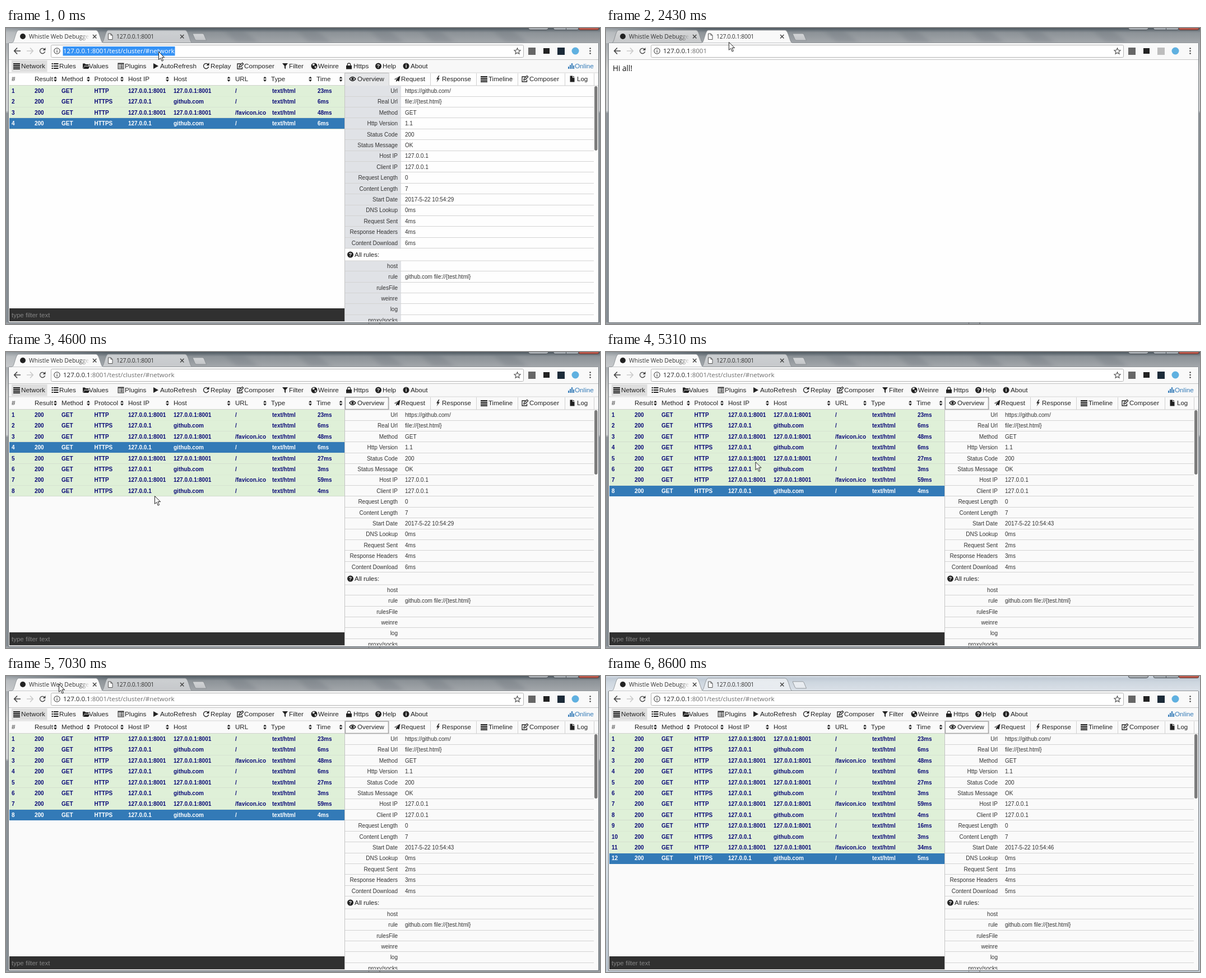
These frames come from a looping animation (1060 by 529 pixels, 8700 ms). An HTML page:

```html
<!DOCTYPE html>
<html lang="en">
<head>
<meta charset="utf-8">
<title>Network panel walkthrough</title>
<style>
html, body { margin: 0; width: 100%; height: 100%; overflow: hidden; }
svg { display: block; width: 100vw; height: 100vh; }
text { font-family: "Liberation Sans", Arial, sans-serif; white-space: pre; }
.ui { font-family: "Open Sans", "Noto Sans", sans-serif; }
.cjk { font-family: "Noto Sans CJK SC", "Noto Sans CJK", sans-serif; }
.b { font-weight: bold; }
.k { animation: 8700ms step-end infinite; }

.select { animation-name: select; }
.early { animation-name: early; }
.tip { animation-name: tip; }
.page { animation-name: page; }
.status { animation-name: status; }
.more1 { animation-name: more1; }
.more2 { animation-name: more2; }
.s1 { animation-name: s1; }
.s2 { animation-name: s2; }
.s3 { animation-name: s3; }
.light { animation-name: light; }
.arrow { animation-name: arrow; }
.move { animation-name: move; }

@keyframes select { 0% { opacity: 1 } 9.195% { opacity: 0 } }
@keyframes early { 0% { opacity: 1 } 23.448% { opacity: 0 } }
@keyframes tip { 0% { opacity: 0 } 18.62% { opacity: .5 } 20.229% { opacity: 1 } 23.448% { opacity: 0 } }
@keyframes page { 0% { opacity: 0 } 23.448% { opacity: 1 } 43.218% { opacity: 0 } 66.321% { opacity: 1 } 79.195% { opacity: 0 } }
@keyframes status { 0% { opacity: 0 } 37.011% { opacity: 1 } 41.838% { opacity: .6 } 43.218% { opacity: 0 } 72.873% { opacity: 1 } 77.7% { opacity: .6 } 79.195% { opacity: 0 } }
@keyframes more1 { 0% { opacity: 0 } 44.827% { opacity: 1 } }
@keyframes more2 { 0% { opacity: 0 } 82.528% { opacity: 1 } }
@keyframes s1 { 0% { opacity: 1 } 56.436% { opacity: 0 } }
@keyframes s2 { 0% { opacity: 0 } 56.436% { opacity: 1 } 89.195% { opacity: 0 } }
@keyframes s3 { 0% { opacity: 0 } 89.195% { opacity: 1 } }
@keyframes light { 0% { opacity: 0 } 98.85% { opacity: 1 } }
@keyframes arrow { 0% { opacity: 1 } 98.85% { opacity: 0 } }
@keyframes move {
  0% { transform: translate(272px, 42px) }
  1.724% { transform: translate(272px, 42px); animation-timing-function: steps(2, start) }
  4.597% { transform: translate(391px, 95px); animation-timing-function: steps(2, start) }
  7.471% { transform: translate(338px, 161px) }
  9.195% { transform: translate(338px, 161px); animation-timing-function: steps(1, start) }
  10.69% { transform: translate(335px, 184px); animation-timing-function: steps(5, start) }
  18.62% { transform: translate(280px, 18px) }
  25.138% { transform: translate(280px, 18px); animation-timing-function: steps(7, start) }
  36.78% { transform: translate(66px, 42px) }
  38.586% { transform: translate(66px, 42px); animation-timing-function: steps(2, start) }
  41.838% { transform: translate(94px, 15px) }
  44.827% { transform: translate(94px, 15px); animation-timing-function: steps(3, start) }
  49.655% { transform: translate(253px, 262px) }
  49.77% { transform: translate(253px, 262px); animation-timing-function: steps(3, start) }
  54.42% { transform: translate(265px, 257px) }
  59.655% { transform: translate(265px, 257px); animation-timing-function: steps(4, start) }
  66.321% { transform: translate(271px, 14px) }
  68.046% { transform: translate(271px, 14px); animation-timing-function: steps(3, start) }
  73.103% { transform: translate(66px, 42px) }
  74.482% { transform: translate(66px, 42px); animation-timing-function: steps(3, start) }
  79.31% { transform: translate(94px, 14px) }
  82.528% { transform: translate(94px, 14px); animation-timing-function: steps(2, start) }
  85.977% { transform: translate(302px, 314px); animation-timing-function: steps(1, start) }
  87.356%, 100% { transform: translate(303px, 317px) }
}
</style>
</head>
<body>
<svg id="stage" viewBox="0 0 1060 529" preserveAspectRatio="none"></svg>
<script>
const rect = (x, y, w, h, fill, more = '') =>
  `<rect x="${x}" y="${y}" width="${w}" height="${h}" fill="${fill}" ${more}/>`;
const text = (x, y, s, size, fill = '#222', more = '') =>
  `<text x="${x}" y="${y}" font-size="${size}" fill="${fill}" ${more}>${s}</text>`;
const path = (d, fill, more = '') => `<path d="${d}" fill="${fill}" ${more}/>`;
const line = (d, stroke, w = 1) => path(d, 'none', `stroke="${stroke}" stroke-width="${w}"`);
const dot = (x, y, r, fill, more = '') => `<circle cx="${x}" cy="${y}" r="${r}" fill="${fill}" ${more}/>`;
const group = (cls, s) => `<g class="k ${cls}">${s}</g>`;
const END = 'text-anchor="end"', MID = 'text-anchor="middle"';

// Icons are centred on 0,0: f is filled, s is stroked, w is cut out in white.
const icons = {
  bars: { f: 'M-6-5h12v1.9h-12zM-6-2h12v1.9h-12zM-6 1h12v1.9h-12zM-6 4h12v1.9h-12z' },
  rules: { f: 'M-6-5h2.5v2h-2.5zM-2.5-5h8.5v2h-8.5zM-6-1h2.5v2h-2.5zM-2.5-1h8.5v2h-8.5zM-6 3h2.5v2h-2.5zM-2.5 3h8.5v2h-8.5z' },
  folder: { f: 'M-6-4.5h4l1 1.5h5.5v2.5h-7.5l-2.5 5h-.5zM-3 .5h9.5l-2.5 4.5h-9z' },
  plugins: { f: 'M-5.5-5.5h11v11h-11zM-4.5-3.5v8h9v-8zM-3.5-2.5h1.5v1.2h-1.5zM-1-2.5h4.5v1.2h-4.5zM-3.5 0h1.5v1.2h-1.5zM-1 0h4.5v1.2h-4.5zM-3.5 2.3h1.5v1.2h-1.5zM-1 2.3h4.5v1.2h-4.5z' },
  play: { f: 'M-4-5l9 5-9 5z' },
  replay: { f: 'M5.5-6v5h-5z', s: 'M3.6-3A4.6 4.6 0 1 0 4.6 1' },
  edit: { s: 'M3.5 1.5v3.5h-8.5v-9h6M-2 2l.7-2.7 5-5 2 2-5 5z' },
  filter: { f: 'M-5-5h10l-4 5v5.5l-2-1.7v-3.8z' },
  globe: { f: 'M-5.5 0a5.5 5.5 0 1 1 11 0a5.5 5.5 0 1 1-11 0z', w: 'M-3-3.5l3-1 1 2-2 2-2-1zM.5 0l3.5 1-2.2 3.2z' },
  lock: { f: 'M-5-1h10v6.5h-10z', s: 'M-2.7-.5v-2a2.7 2.7 0 0 1 5.4 0v2' },
  chart: { f: 'M-5 1h2v4h-2zM-2-2h2v7h-2zM1-5h2v10h-2zM4-1h2v6h-2z' },
  eye: { f: 'M-2.2 0a2.2 2.2 0 1 1 4.4 0a2.2 2.2 0 1 1-4.4 0z', s: 'M-5.5 0Q0-7 5.5 0Q0 7-5.5 0z' },
  plane: { f: 'M-5.5 1L5.5-5.5l-2 10-3.3-1.5-2 2.5v-3.7l4.3-5-5.5 4.3z' },
  bolt: { f: 'M1-6l-4 6.5h2.5l-2 5.5 5.5-7.5h-2.8l2.3-4.5z' },
  file: { f: 'M-4-5.5h4.5v3.5h3.5v7.5h-8zM1.5-5.5l2.5 2.5h-2.5z' }
};
const icon = (name, x, y, color = '#222') => {
  if (name === 'help' || name === 'info')
    return dot(x, y, 5.5, color) + text(x, y + 3.3, name === 'help' ? '?' : 'i', 9.5, '#fff', `class="b" ${MID}`);
  const { f, s, w } = icons[name];
  return `<g transform="translate(${x} ${y})">` +
    (f ? path(f, color, 'fill-rule="evenodd"') : '') +
    (s ? line(s, color, 1.3) : '') + (w ? path(w, '#fff') : '') + '</g>';
};

const tab = (x, w, fill) =>
  path(`M${x} 26.5C${x + 4} 26 ${x + 6} 5 ${x + 11} 4H${x + w - 12}C${x + w - 6} 5 ${x + w - 4} 26 ${x + w} 26.5z`, fill, 'stroke="#85898d" stroke-width=".8"');
const cross = x => line(`M${x - 3} 12l6.4 6.4m0-6.4l-6.4 6.4`, '#444', 1.4);

// Tab strip, toolbar and address bar; first tells which tab is active.
function chrome(first) {
  const bar = '#f9f9f9';
  const left = tab(11, 162, first ? bar : 'url(#idle)'), right = tab(171, 161, first ? 'url(#glass)' : bar);
  const host = '<tspan fill="#222">127.0.0.1</tspan>';
  return (first ? right + left : left + right) +
    rect(5, 26.5, 1052, 30, bar) +
    line(first ? 'M5 26.5H11M173 26.5H1057' : 'M5 26.5H171M332 26.5H1057', '#909498') +
    dot(30, 15, 5, '#222') +
    text(41, 19, 'Whistle Web Debugger', 10.5, 'url(#fade)', 'class="ui"') + cross(158) +
    path('M182.5 10h4.5l3 3v7.5h-7.5zM187 10v3h3', '#fff', 'stroke="#555"') +
    text(197, 19, '127.0.0.1:8001', 10.3, '#333', 'class="ui" letter-spacing="-.2"') + cross(314) +
    line('M26 41H15M20 35.5L14.8 41L20 46.5', '#444', 1.7) +
    line('M37 41H48M43 35.5L48.2 41L43 46.5', '#ccc', 1.7) +
    icon('replay', 65, 41, '#444') +
    rect(80.5, 30.5, 843, 22, '#fff', 'rx="2" stroke="#b4b4b4"') +
    dot(91, 41, 5.2, 'none', 'stroke="#555" stroke-width="1.2"') + rect(90.4, 40, 1.3, 4, '#555') + rect(90.4, 37.8, 1.3, 1.3, '#555') +
    text(102, 45, host + ':8001' + (first ? '/test/cluster/#network' : ''), 11.5, '#6c6c6c', 'class="ui"') +
    line('M912.5 36l1.6 3.5 3.9.4-2.9 2.6.8 3.8-3.4-2-3.4 2 .8-3.8-2.9-2.6 3.9-.4z', '#555', 1.2) +
    rect(932, 35, 13, 13, '#666') + rect(959, 36, 11, 10, '#222') +
    rect(984, 35, 13, 13, first ? '#1b2a38' : '#bdbdbd') + dot(1016, 41, 6.5, '#5fb0e0') +
    [36.5, 41, 45.5].map(y => dot(1042.5, y, 1.3, '#444')).join('') +
    line('M5 56.5H1057', '#c4c4c4');
}

const PITCH = 19.4;
const times = [23, 6, 48, 6, 27, 3, 59, 4, 16, 3, 34, 5];

function row(n, on) {
  const y = 102.8 + (n - 1) * PITCH, plain = n % 2, ink = on ? '#fff' : '#0a0a78';
  const top = Math.ceil(y), end = Math.round(y + PITCH);
  const ip = plain ? '127.0.0.1:8001' : '127.0.0.1';
  const cells = [
    [10, n], [51, 200], [99, 'GET'], [157.5, plain ? 'HTTP' : 'HTTPS'], [218, ip],
    [299, plain ? ip : 'github.com'], [409, n % 4 === 3 ? '/favicon.ico' : '/'],
    [475, 'text/html'], [556, times[n - 1] + 'ms']
  ];
  return (on ? rect(6, top, 598, end - top, '#337ab7')
    : rect(6, y, 598, PITCH, '#dff0d8') + rect(6, Math.ceil(y + PITCH) - 1, 598, 1, '#d0dccc')) +
    cells.map(([x, s]) => text(x, y + 13.2, s, 10, ink, 'class="b"')).join('');
}
const rows = (from, to) => {
  let s = '';
  for (let n = from; n <= to; n++) s += row(n);
  return s;
};

function menu() {
  const items = [
    ['bars', 19, 27, 'Network'], ['rules', 87.5, 95, 'Rules'], ['folder', 143, 148, 'Values'],
    ['plugins', 205, 212, 'Plugins'], ['play', 267, 275, 'AutoRefresh'], ['replay', 357, 365, 'Replay'],
    ['edit', 418, 425, 'Composer'], ['filter', 498, 505, 'Filter'], ['globe', 550, 557, 'Weinre'],
    ['lock', 612, 620, 'Https'], ['help', 664.5, 672, 'Help'], ['info', 714, 722, 'About']
  ];
  return rect(5, 57, 1052, 23, '#f8f8f8') + rect(10, 58, 63.5, 20.5, '#dedede') +
    items.map(([i, x, tx, s]) => icon(i, x, 68) + text(tx, 72, s, 11.7)).join('') +
    icon('chart', 1008, 68, '#337ab7') + text(1015, 72, 'Online', 11.7, '#337ab7') +
    line('M5 80H1057', '#d4d4d4');
}

function table() {
  const heads = [
    [10, '#'], [51, 'Result', 88], [99, 'Method', 147], [157.5, 'Protocol', 207], [218, 'Host IP', 288],
    [299, 'Host', 397.5], [409, 'URL', 462], [473, 'Type', 543], [554, 'Time', 597.5]
  ];
  return heads.map(([x, s, sx]) => text(x, 95, s, 11.6) +
      (sx ? path(`M${sx - 3} 90.3l3-3.6 3 3.6zM${sx - 3} 92.3l3 3.6 3-3.6z`, '#222') : '')).join('') +
    line('M6 102.5H604', '#ccc') +
    rows(1, 4) + group('more1', rows(5, 8)) + group('more2', rows(9, 12)) +
    [4, 8, 12].map((n, i) => group('s' + (i + 1), row(n, true))).join('') +
    rect(6, 501, 598, 23.5, '#303030') + text(10, 517, 'type filter text', 11.5, '#858585') +
    line('M604.5 80V525', '#c4c4c4');
}

function panel() {
  const tabs = [
    ['eye', 618.5, 627, 'Overview', 683], ['plane', 698, 705, 'Request', 757], ['bolt', 771, 778, 'Response', 839],
    ['bars', 853, 861, 'Timeline', 913], ['edit', 926, 934, 'Composer', 997], ['file', 1010.5, 1019, 'Log', 1049]
  ];
  const fields = [
    ['Url', 'https://github.com/'], ['Real Url', 'file://{test.html}'], ['Method', 'GET'], ['Http Version', '1.1'],
    ['Status Code', '200'], ['Status Message', 'OK'], ['Host IP', '127.0.0.1'], ['Client IP', '127.0.0.1'],
    ['Request Length', '0'], ['Content Length', '7'], ['Start Date', ''], ['DNS Lookup', '0ms'],
    ['Request Sent', ''], ['Response Headers', ''], ['Content Download', '']
  ];
  const rules = [['host', ''], ['rule', 'github.com file://{test.html}'], ['rulesFile', ''], ['weinre', ''], ['log', ''], ['proxy/socks', '']];
  const runs = [['29', 4, 4, 6], ['43', 2, 3, 4], ['46', 1, 4, 5]];
  const base = i => 116 + i * PITCH;
  const value = (i, s) => text(712, base(i), s, 10, '#333');
  const list = (items, top) => items.map(([k, v], i) => {
    const y = top + i * PITCH;
    return text(699, y, k, 10, '#333', END) + text(712, y, v, 10, '#333') +
      line(`M605 ${Math.round(y + 5.5) + .5}H1049`, '#d3d3d3');
  }).join('');
  return line('M605 103H1057', '#ccc') +
    rect(605.5, 81, 77, 21.5, 'none', 'stroke="#a8a8a8" stroke-width="1.5"') +
    group('early', rect(605, 81, 78.5, 22, '#e6e7e9') +
      rect(605, 103, 100, 291.5, '#e0e2e6') + rect(605, 416, 100, 109, '#e0e2e6')) +
    tabs.map(([i, x, tx, s, end]) => icon(i, x, 91) + text(tx, 95, s, 11.5) + line(`M${end + .5} 81V103`, '#d0d0d0')).join('') +
    list(fields, base(0)) +
    runs.map(([sec, ...ms], r) => group('s' + (r + 1),
      value(10, '2017-5-22 10:54:' + sec) + ms.map((m, i) => value(12 + i, m + 'ms')).join(''))).join('') +
    icon('help', 614.5, 405) + text(622, 409, 'All rules:', 11.5) + line('M605 416H1049', '#d3d3d3') +
    list(rules, 428.7) +
    rect(1050, 104, 5.5, 115, '#7c7c7c', 'rx="2.7"');
}

const page = rect(5, 57, 1052, 469, '#fefefe') +
  text(12, 77, 'Hi all!', 13.6, '#111', 'class="ui"') +
  group('status', rect(4.5, 507.5, 350, 19, '#fdfdfd', 'stroke="#dedede" rx="2"') +
    text(8, 520.5, '正在等待 127.0.0.1 的响应...', 9.9, '#777', 'class="cjk"'));

const frame = (name, bottom) => rect(0, 0, 1060, 27, `url(#${name}Top)`) +
  rect(0, 27, 5, 502, `url(#${name}Side)`) + rect(1057, 27, 3, 502, `url(#${name}Side)`) +
  rect(0, 526, 1060, 3, bottom);

const grad = (id, stops, more = 'x2="0" y2="1"') => `<linearGradient id="${id}" ${more}>` +
  stops.map(([o, c, a = 1]) => `<stop offset="${o}" stop-color="${c}" stop-opacity="${a}"/>`).join('') + '</linearGradient>';

const defs = '<defs>' +
  grad('darkTop', [[0, '#4c565e'], [.14, '#6a737a'], [.3, '#8c9297'], [1, '#a3a7ab']]) +
  grad('darkSide', [[0, '#a9adb1'], [.1, '#d0d0cf'], [.24, '#cfd1d3'], [.25, '#8f959a'], [1, '#878e94']]) +
  grad('paleTop', [[0, '#d6dde5'], [.15, '#c0cad5'], [.4, '#cdd6df'], [1, '#dbe1e8']]) +
  grad('paleSide', [[0, '#d5dce3'], [.5, '#dde4ea'], [1, '#bcc6d0']]) +
  grad('idle', [[0, '#d6d7d8'], [1, '#c6c8ca']]) +
  grad('glass', [[0, '#fff', .6], [1, '#fff', .4]]) +
  grad('glow', [[0, '#fff', .4], [1, '#fff', 0]], '') +
  grad('fade', [[0, '#333'], [.84, '#333'], [1, '#333', 0]], 'gradientUnits="userSpaceOnUse" x1="41" x2="149"') +
  '<filter id="blur" x="-20%" width="140%" y="-50%" height="200%"><feGaussianBlur stdDeviation="5 2"/></filter></defs>';

const streaks = rect(0, 0, 180, 27, 'url(#glow)') + '<g filter="url(#blur)" opacity=".2">' +
  [390, 520, 650, 740, 870].map(x => path(`M${x} 5h34l26 20h-40z`, '#5b646c')).join('') + '</g>';

const buttons = rect(932, -12, 36, 15.5, '#a8adb2', 'rx="4" stroke="#4b5157"') +
  rect(977, -12, 45, 15.5, '#a5abb1', 'rx="3" stroke="#50575d"') + line('M999.5 0V3', '#50575d') +
  rect(1022, -12, 36, 15.5, '#b9574a', 'rx="3" stroke="#5d3a36"');

const newTab = path('M333 10h17.5q2 0 2.8 2l4.2 10h-17.5q-2 0-2.8-2l-4.2-10z', 'url(#glass)', 'stroke="#85898d" stroke-width=".8"');

const selection = group('select', rect(101.5, 33, 200, 16.5, '#3592f5') +
  text(102, 45, '127.0.0.1:8001/test/cluster/#network', 11.5, '#fff', 'class="ui"'));

const tip = group('tip', rect(283, 38, 76, 16, '#000', 'rx="2" opacity=".25"') +
  rect(280.5, 35.5, 76, 16, '#fcfcfd', 'rx="2" stroke="#777"') +
  text(285, 47.5, '127.0.0.1:8001', 10.1, '#555', 'class="ui" letter-spacing="-.2"'));

const pointer = group('arrow', '<g class="k move">' +
  path('M.5.5V14.5L3.8 11.4L6.2 17.2L8.5 16.2L6.1 10.6H10.6z', '#fff', 'stroke="#222" stroke-width="1"') + '</g>');

document.getElementById('stage').innerHTML = defs +
  frame('dark', '#9a9fa4') + streaks + group('light', frame('pale', '#c3ccd5')) + buttons + newTab +
  rect(5, 27, 1052, 499, '#fafafa') + group('early', rect(5, 80, 1052, 446, '#fefefe')) +
  chrome(true) + selection + menu() + table() + panel() +
  rect(5, 524.5, 1052, 1.5, '#f4f4f4') +
  group('page', chrome(false) + page) +
  line('M4.5 27V526.5H1057.5V27', '#71777c') + tip + pointer;
</script>
</body>
</html>
```
